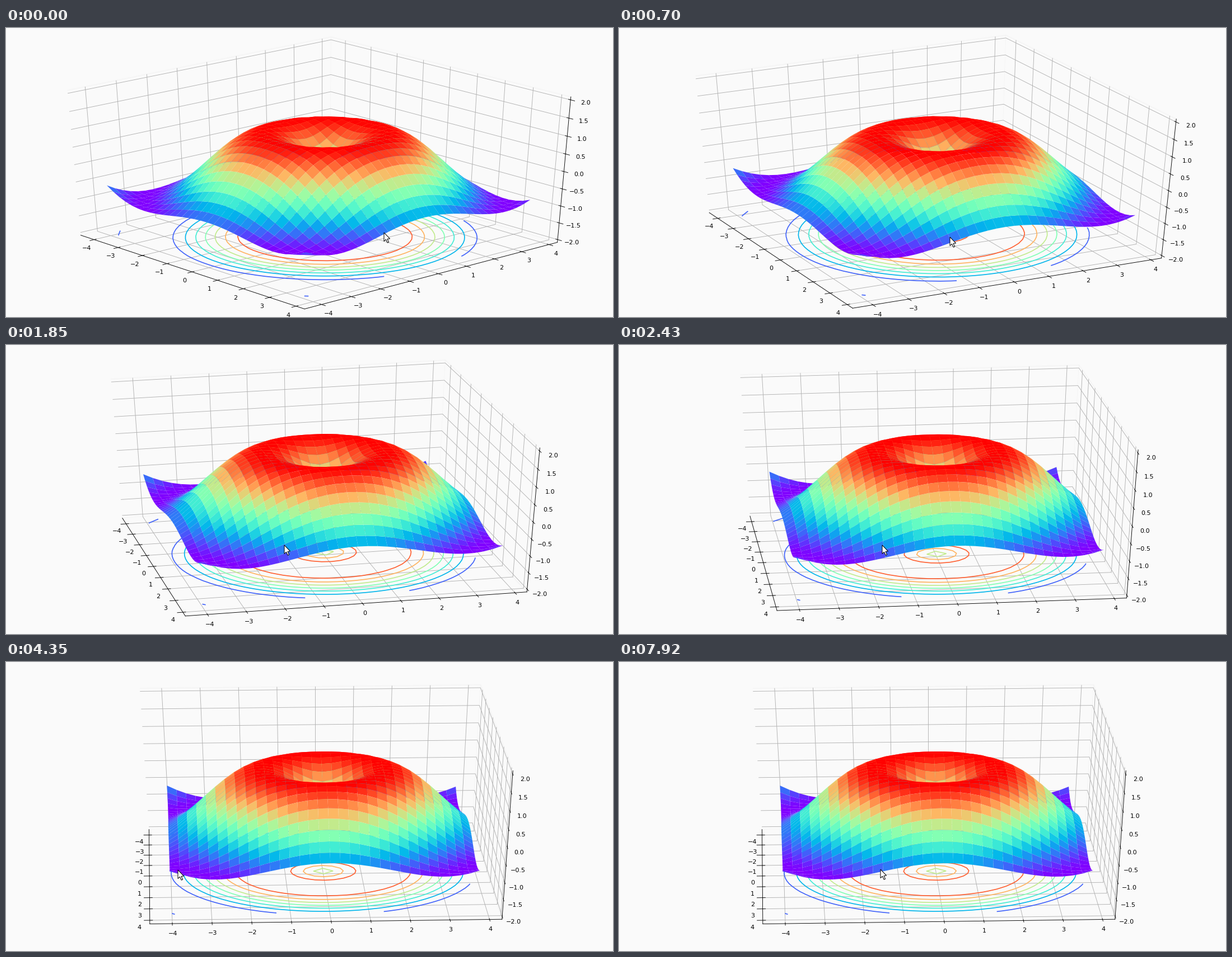
A matplotlib script that plays this animation: 1084 px wide and 517 px high, repeating every 8000 ms.

```python
import numpy as np
import matplotlib.pyplot as plt
from matplotlib.animation import FuncAnimation
from matplotlib.patches import Polygon
from matplotlib.transforms import Affine2D
from mpl_toolkits.mplot3d import Axes3D

W, H, DPI = 1084, 517, 80
LOOP, FRAMES, STEPS = 8000, 100, 57
INTERVAL = LOOP // FRAMES
BACKGROUND = "#fafafa"

# The plot fills a box slightly larger than the stage.
BOX_LEFT, BOX_TOP, BOX_W, BOX_H = -7.1, -13, 1099.8, 542

# The picture is refreshed in 57 even steps; key points are counted in them.
VIEW_STEPS = [0, 5, 13, 17, 19]
AZIMUTH = [-41.9, -26.8, -13, -7, -2.6]
ELEVATION = [31.7, 36.1, 34, 32, 32]

POINTER_STEPS = [0, 5, 13, 17, 27, 31, 33, 45, 56]
POINTER_X = [675, 591, 497, 470, 295, 307, 336, 408, 467]
POINTER_Y = [366, 374, 358, 358, 364, 372, 382, 382, 371]


class StretchedAxes(Axes3D):
    """3D axes that fill their rectangle instead of staying square."""

    def apply_aspect(self, position=None):
        pass


def padded(low, high):
    pad = (high - low) / 48
    return low - pad, high + pad


fig = plt.figure(figsize=(W / DPI, H / DPI), dpi=DPI, facecolor=BACKGROUND)
ax = StretchedAxes(fig, [BOX_LEFT / W, 1 - (BOX_TOP + BOX_H) / H, BOX_W / W, BOX_H / H])
fig.add_axes(ax)
ax.patch.set_visible(False)
ax.computed_zorder = False

side = np.arange(-4, 4, 0.25)
X, Y = np.meshgrid(side, side)
Z = np.sin(np.hypot(X, Y))
ax.contour(X, Y, Z, levels=np.arange(-1, 1.01, 0.25), zdir="z", offset=-2,
           cmap="rainbow", linewidths=1.5, zorder=1)
ax.plot_surface(X, Y, Z, rstride=1, cstride=1, cmap="rainbow", zorder=2)

margin = 0.05 * np.ptp(side)
span = padded(side[0] - margin, side[-1] + margin)
ax.set_xlim(span)
ax.set_ylim(span)
ax.set_zlim(padded(-2, 2))
ax.set_xticks(range(-4, 5))
ax.set_yticks(range(-4, 5))
ax.set_zticks(np.arange(-2, 2.1, 0.5))
# This zoom cancels the built-in scaling, leaving a cube of side 25/24.
ax.set_box_aspect((1, 1, 1), zoom=np.sqrt(3) / 1.8294640721620434)
for axis in (ax.xaxis, ax.yaxis, ax.zaxis):
    axis.set_pane_color(BACKGROUND)
    axis.pane.set_edgecolor("#f3f3f3")

arrow = [(0, 0), (0, 15.5), (3.5, 12.3), (6.2, 18.2), (8.6, 17.1), (6, 11.4), (10.6, 11)]
pointer = Polygon(arrow, facecolor="white", edgecolor="black", linewidth=0.9, zorder=10)
fig.add_artist(pointer)


def draw(frame):
    # Look slightly ahead so a refresh within the frame is not shown late.
    step = int((frame * INTERVAL + 70) * STEPS / LOOP)
    ax.view_init(elev=np.interp(step, VIEW_STEPS, ELEVATION),
                 azim=np.interp(step, VIEW_STEPS, AZIMUTH))
    x = np.interp(step, POINTER_STEPS, POINTER_X)
    y = np.interp(step, POINTER_STEPS, POINTER_Y)
    pointer.set_transform(Affine2D().scale(1, -1).translate(x, H - y))
    return ()


def start():
    return draw(0)


anim = FuncAnimation(fig, draw, frames=FRAMES, init_func=start,
                     interval=INTERVAL, repeat=True, repeat_delay=0)
plt.show()
```
